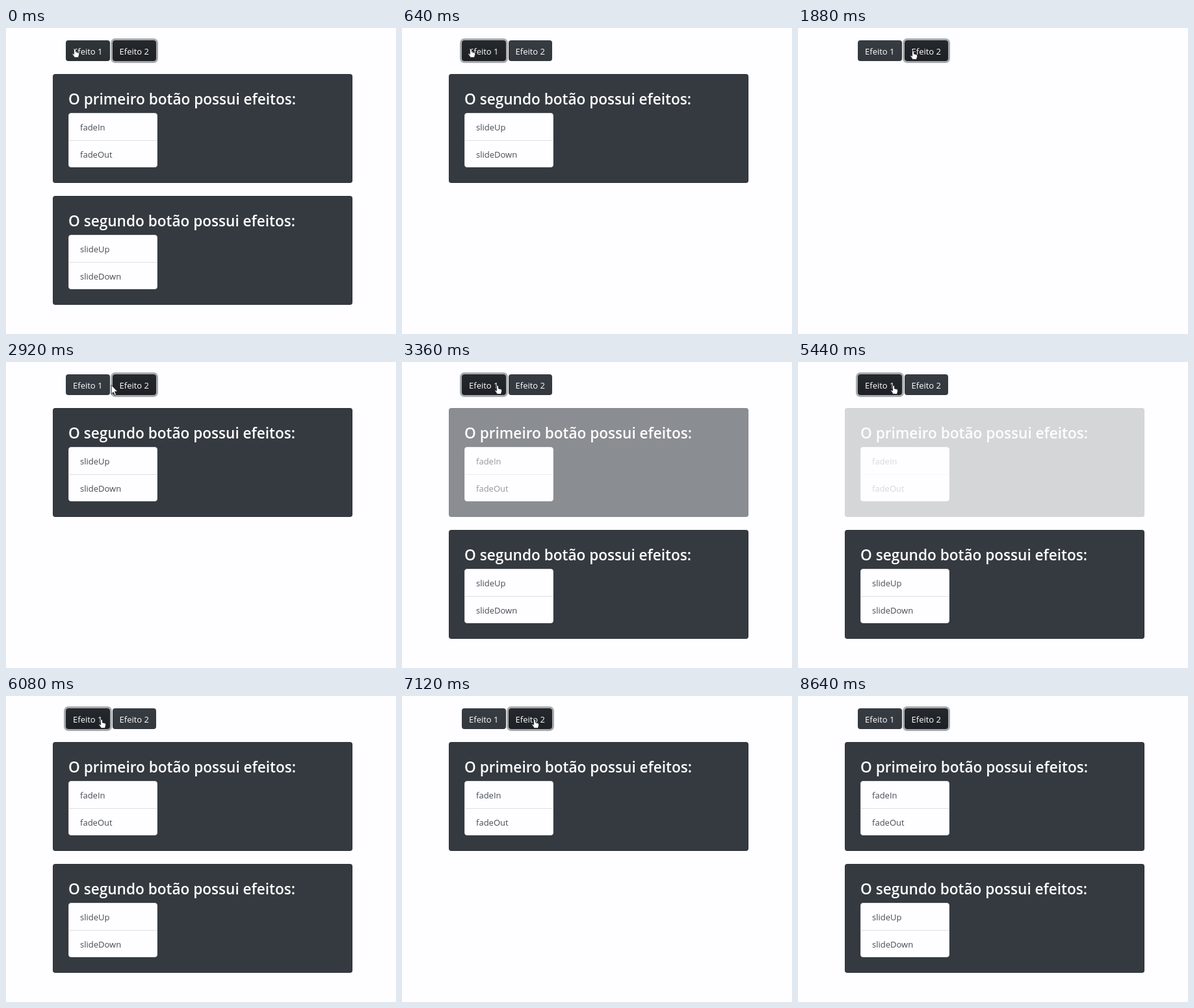
Recreate the animation shown at these times as an HTML page. Size 600 by 472 pixels, loop 9560 ms.

```html
<!DOCTYPE html>
<html lang="pt">
<head>
<meta charset="utf-8">
<style>
  html, body { margin: 0; width: 100%; height: 100%; overflow: hidden; background: #fefdff; }
  body { font: 13px/20px "Open Sans", "Noto Sans", sans-serif; }
  #stage { position: relative; width: 600px; height: 472px; overflow: hidden; }
  .button {
    position: absolute; top: 18.5px; height: 32.2px; border-radius: 4px;
    color: #fff; background: linear-gradient(#363c42, #32383e);
    line-height: 34px; text-align: center; white-space: nowrap;
  }
  .button.hover { background: linear-gradient(#30353a, #2a2f34); }
  .button.focus { background: linear-gradient(#25292d, #1d2125); box-shadow: 0 0 0 3px #a8abae; }
  .panel {
    position: absolute; left: 71.5px; width: 461.3px; overflow: hidden;
    border-radius: 4px; background: #343a40; box-shadow: inset 0 0 0 1px #0002;
  }
  .content { position: absolute; left: 24.5px; top: 0; }
  h2 {
    position: absolute; top: 24px; margin: 0; color: #fff;
    font-size: 22.6px; font-weight: 600; line-height: 30px; white-space: nowrap;
  }
  ul {
    position: absolute; top: 60px; width: 137px; height: 83.5px; margin: 0; padding: 0;
    box-sizing: border-box; border: 1px solid #dfdfe0; border-radius: 4px;
    background: #fefdff; color: #454b51; list-style: none;
  }
  li { height: 41px; padding-left: 17px; line-height: 43px; }
  li + li { border-top: 1px solid #dfdfe0; }
  svg { position: absolute; left: 0; top: 0; overflow: visible; }
  path { fill: #fff; stroke: #22262a; stroke-width: .9; stroke-linejoin: round; }
</style>
</head>
<body>
<div id="stage">
  <div class="button" style="left:92px; width:67.5px">Efeito 1</div>
  <div class="button" style="left:163.5px; width:67.5px">Efeito 2</div>
  <div class="panel" id="fadePanel" style="top:71px; height:168px">
    <div class="content">
      <h2>O primeiro botão possui efeitos:</h2>
      <ul><li>fadeIn</li><li>fadeOut</li></ul>
    </div>
  </div>
  <div class="panel" id="slidePanel">
    <div class="content">
      <h2>O segundo botão possui efeitos:</h2>
      <ul><li>slideUp</li><li>slideDown</li></ul>
    </div>
  </div>
  <svg width="1" height="1">
    <g id="cursor">
      <path id="hand" d="M-1.4 1Q0-1 1.4 1V5L5 5.8Q7 6.4 6.6 8.6L5.4 13.5H-.5L-4 8.4Q-3.6 6.6-1.4 8.4Z"/>
      <path id="arrow" d="M0 0V14L3.2 11L5.4 16L7.6 15L5.4 10.2H9.8Z"/>
    </g>
  </svg>
</div>
<script>
  const LOOP = 9560, STEP = 40, DURATION = 500;
  const PANEL_TOP = 71, PANEL_HEIGHT = 168, PANEL_PITCH = 188, PADDING = 24;

  // Click times; each click alternately hides and shows its panel.
  const fadeClicks = [40, 3088, 4470, 5294];
  const slideClicks = [1350, 2240, 6320, 7120];

  // Pointer path: time, x, y
  const pointerPath = [
    [0, 106, 32], [1000, 106, 32], [1280, 177, 35], [2800, 177, 35], [3040, 147, 36],
    [6180, 147, 36], [6300, 204, 36], [7780, 204, 36], [8200, 57, 50],
    [8380, 57, 50], [8640, 612, 72], [LOOP, 612, 72]
  ];

  const byId = id => document.getElementById(id);
  const fadePanel = byId("fadePanel"), slidePanel = byId("slidePanel");
  const slideContent = slidePanel.querySelector(".content");
  const cursor = byId("cursor"), hand = byId("hand"), arrow = byId("arrow");
  const buttons = [...document.querySelectorAll(".button")];

  const swing = p => 0.5 - Math.cos(Math.PI * Math.min(1, Math.max(0, p))) / 2;
  const lastClick = (clicks, t) => clicks.filter(c => c <= t).length - 1;

  function shownAmount(clicks, t) {
    const i = lastClick(clicks, t);
    if (i < 0) return 1;
    const eased = swing((t - clicks[i]) / DURATION);
    return i % 2 ? eased : 1 - eased;
  }

  function pointerAt(t) {
    const i = pointerPath.findIndex(point => point[0] > t);
    const [t0, x0, y0] = pointerPath[i - 1], [t1, x1, y1] = pointerPath[i];
    const e = swing((t - t0) / (t1 - t0));
    return [x0 + (x1 - x0) * e, y0 + (y1 - y0) * e];
  }

  function render(t) {
    const fade = shownAmount(fadeClicks, t);
    fadePanel.style.opacity = fade;

    // The second panel takes the first one's place once that is hidden.
    const slide = shownAmount(slideClicks, t);
    slidePanel.style.top = PANEL_TOP + (fade > 0 ? PANEL_PITCH : 0) + "px";
    slidePanel.style.height = PANEL_HEIGHT * slide + "px";
    slideContent.style.top = -PADDING * (1 - slide) + "px";

    const [x, y] = pointerAt(t);
    const lastFade = fadeClicks[lastClick(fadeClicks, t)] ?? -1;
    const lastSlide = slideClicks[lastClick(slideClicks, t)] ?? 0;
    const focused = lastFade > lastSlide ? 0 : 1;
    let overButton = false;
    buttons.forEach((button, i) => {
      const left = 92 + i * 71.5;
      const hover = x >= left && x <= left + 67.5 && y >= 18 && y <= 51;
      overButton ||= hover;
      button.classList.toggle("hover", hover);
      button.classList.toggle("focus", i === focused);
    });
    cursor.setAttribute("transform", `translate(${x} ${y})`);
    hand.style.display = overButton ? "" : "none";
    arrow.style.display = overButton ? "none" : "";
  }

  const start = performance.now();
  function tick() {
    const t = (performance.now() - start) % LOOP;
    render(Math.floor(t / STEP) * STEP);
    requestAnimationFrame(tick);
  }
  tick();
</script>
</body>
</html>
```
